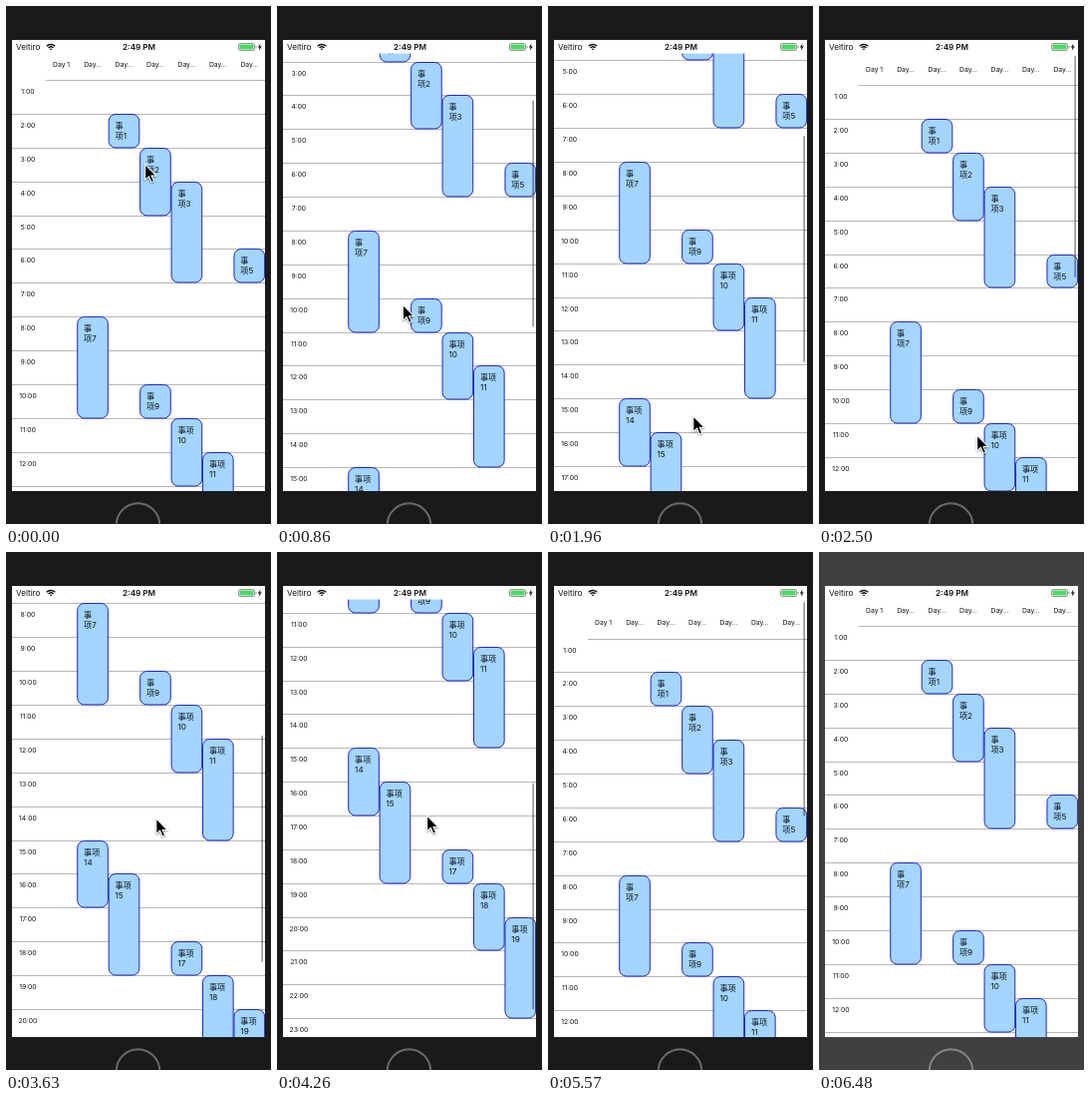
An HTML page with a canvas for the animation above (6560 ms loop, 266 by 519 pixels).

```html
<!DOCTYPE html>
<html lang="en">
<head>
<meta charset="utf-8">
<title>Week schedule</title>
<style>
  html, body { margin: 0; width: 100%; height: 100%; overflow: hidden; background: #1a1a1a; }
  canvas { display: block; }
</style>
</head>
<body>
<canvas id="stage" width="266" height="519"></canvas>
<script>
const ctx = document.getElementById('stage').getContext('2d');
const LOOP = 6560;
const PT = 254 / 375;            // stage pixels per screen point
const STATUS = 20 * PT, HEADER = 40 * PT, ROW = 50 * PT;
const LABELS = 50 * PT, COL = 325 / 7 * PT;
const SMALL = 10 * PT, NORMAL = 12 * PT;
const MAX_SCROLL = 593 * PT;
const SANS = 'Inter, "Noto Sans CJK SC", "Noto Sans CJK", sans-serif';

// Eased progress from 0 to 1 between two times.
function ease(t, from, to) {
  const u = Math.min(1, Math.max(0, (t - from) / (to - from)));
  return u * u * (3 - 2 * u);
}

// Two swipes up, each answered by a swipe down that bounces at the top.
function scrollAt(t) {
  return 444 * ease(t, 700, 1270) - 462 * ease(t, 1330, 2410) + 18 * ease(t, 2410, 2550)
    + 352 * ease(t, 2900, 4000) - 366 * ease(t, 4360, 5450) + 14 * ease(t, 5450, 6040);
}

function pointerAt(t) {
  const reach = ease(t, 60, 660), up = ease(t, 700, 1250), down = ease(t, 1330, 2050);
  const rest = ease(t, 2070, 2470), upAgain = ease(t, 2800, 3700), leave = ease(t, 4360, 5190);
  return [
    139.5 - 13.5 * reach + up + 19.5 * down + 12 * rest - 8 * upAgain + 45 * leave,
    158.5 + 172.5 * reach - 154 * up + 244 * down + 9 * rest - 166 * upAgain + 258 * leave
  ];
}

function text(str, x, y, size, align = 'center', weight = 400) {
  ctx.font = `${weight} ${size}px ${SANS}`;
  ctx.textAlign = align;
  ctx.fillStyle = '#111';
  ctx.fillText(str, x, y + size * 0.36);
}

function box(x, y, w, h, r, fill, stroke) {
  ctx.beginPath();
  ctx.roundRect(x, y, w, h, r);
  if (fill) { ctx.fillStyle = fill; ctx.fill(); }
  if (stroke) { ctx.strokeStyle = stroke; ctx.lineWidth = 1; ctx.stroke(); }
}

function polygon(points, fill) {
  ctx.beginPath();
  points.forEach(p => ctx.lineTo(...p));
  ctx.closePath();
  ctx.fillStyle = fill;
  ctx.fill();
}

function statusBar() {
  ctx.fillStyle = '#fff';
  ctx.fillRect(0, 0, 254, STATUS);
  text('Veltiro', 4, 7, NORMAL, 'left');
  text('2:49 PM', 127.5, 7, NORMAL, 'center', 600);

  ctx.strokeStyle = '#111';
  ctx.lineWidth = 1.5;
  for (let r = 0.8; r < 6; r += 2.5) {
    ctx.beginPath();
    ctx.arc(39, 10.2, r, -Math.PI * 0.76, -Math.PI * 0.24);
    ctx.stroke();
  }

  box(227.5, 3.5, 16, 7, 1.5, null, '#999');
  box(228.5, 4.5, 14, 5, 0.5, '#4cd964');
  box(244.5, 5.8, 1, 2.5, 0.5, '#999');
  polygon([[249.5, 3.4], [246.8, 7.4], [248.5, 7.4], [247.8, 10.8], [250.8, 6.4], [249, 6.4]], '#111');
}

function schedule(scroll) {
  const top = STATUS - scroll;
  const rowTop = k => Math.floor(top + HEADER + k * ROW);

  for (let d = 0; d < 7; d++) {
    text(d ? 'Day…' : 'Day 1', LABELS + (d + 0.5) * COL, top + 10.6, SMALL);
  }
  for (let k = 0; k < 28; k++) {
    const x = k ? 0 : LABELS;
    ctx.fillStyle = '#b6b6b6';
    ctx.fillRect(x, rowTop(k), 254 - x, 1);
    text(`${k + 1}:00`, 15.9, rowTop(k) + 11.2, SMALL);
  }
  for (let n = 1; n < 20; n++) {
    const col = (n + 1) % 7, rows = n % 4;
    if (!col || !rows) continue;
    const x = LABELS + col * COL, y = rowTop(n);
    box(x + 0.4, y + 0.5, COL - 0.8, rowTop(n + rows) - y - 0.5, 6.8, '#a2d5ff', '#2424c8');
    const lines = n < 10 ? ['事', '项' + n] : ['事项', n];
    lines.forEach((s, i) => text(s, x + 6.8, y + 12 + i * 9.7, NORMAL, 'left'));
  }
}

// The bar gets shorter while the list is pulled past an end.
function scrollBar(t, scroll) {
  const over = Math.max(0, -scroll, scroll - MAX_SCROLL);
  const part = Math.min(1, Math.max(0, scroll / MAX_SCROLL));
  const length = 227 - over;
  ctx.globalAlpha = t < 700 ? 0 : 1 - ease(t, 5920, 6070);
  box(256.3, 50 + part * (434 - length), 1.7, length, 0.8, 'rgba(0,0,0,.4)');
  ctx.globalAlpha = 1;
}

function pointer(x, y) {
  ctx.save();
  ctx.translate(x + 0.7, y + 1.5);
  ctx.lineWidth = 2;
  ctx.strokeStyle = '#fff';
  ctx.shadowColor = 'rgba(0,0,0,.4)';
  ctx.shadowBlur = 2;
  ctx.shadowOffsetY = 1;
  const arrow = [[0, 0], [0, 13], [3.4, 10], [6, 16], [7.6, 15.3], [5, 9.6], [9.4, 9.6]];
  polygon(arrow, '#000');
  ctx.stroke();
  ctx.shadowColor = 'transparent';
  polygon(arrow, '#000');
  ctx.restore();
}

function draw(t) {
  const inactive = t >= 6480;
  const scroll = scrollAt(t);
  ctx.fillStyle = inactive ? '#404040' : '#1a1a1a';
  ctx.fillRect(0, 0, 266, 519);
  ctx.beginPath();
  ctx.arc(132.5, 520, 21.7, 0, 7);
  ctx.strokeStyle = inactive ? '#858585' : '#6b6b6b';
  ctx.lineWidth = 2;
  ctx.stroke();

  ctx.save();
  ctx.translate(6, 34);
  ctx.beginPath();
  ctx.rect(0, 0, 254, 452);
  ctx.clip();
  ctx.fillStyle = '#fff';
  ctx.fillRect(0, 0, 254, 452);
  schedule(scroll);
  statusBar();
  ctx.restore();

  scrollBar(t, scroll);
  if (t < 5400) pointer(...pointerAt(t));
}

const start = performance.now();
function tick() {
  draw((performance.now() - start) % LOOP);
  requestAnimationFrame(tick);
}
tick();
</script>
</body>
</html>
```
